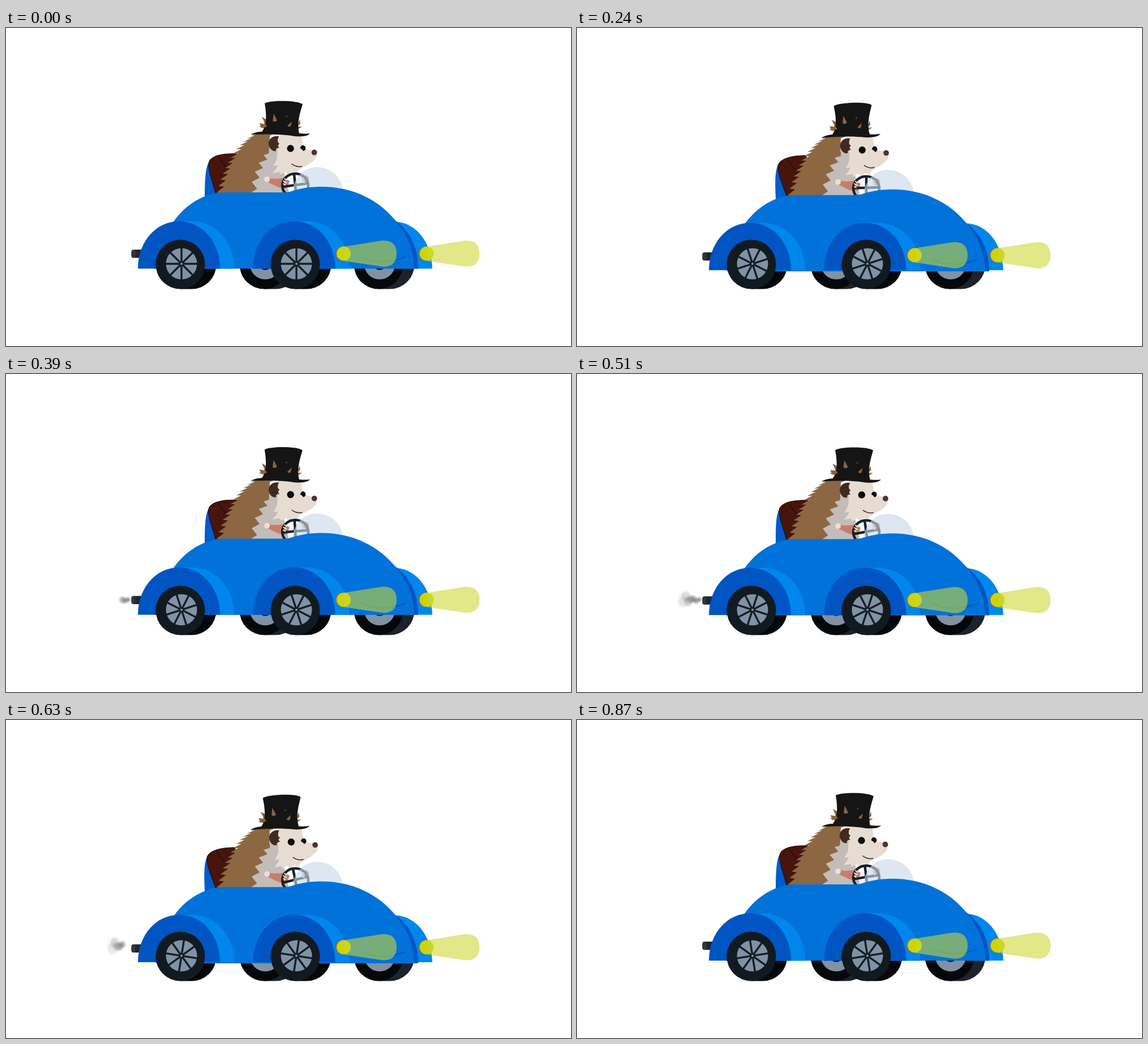
Write an HTML page that moves like this. It is 998x561 px and loops after 0.9 s.

```html
<!DOCTYPE html>
<html lang="en">
<head>
<meta charset="utf-8">
<title>Hedgehog driver</title>
<style>
html, body { margin: 0; width: 100%; height: 100%; overflow: hidden; background: #fff; }
svg { display: block; width: 998px; height: 561px; }
</style>
</head>
<body>
<svg viewBox="0 0 998 561">
  <defs>
    <filter id="soft" x="-50%" y="-50%" width="200%" height="200%"><feGaussianBlur stdDeviation="1.6"/></filter>
    <clipPath id="trail"><rect x="178" y="380" width="46" height="40"/></clipPath>
    <g id="fender">
      <path fill="#0086ec" d="M305 341H330C371 342 403 377 403 424.500H305Z"/>
      <path fill="#0055c3" d="M233 424.500C233 378 264 341 305.500 341S378 378 378 424.500Z"/>
      <path fill="#0049aa" d="M262 424.500C262 396 282 375 310 374V424.500Z"/>
    </g>
    <g id="lamp">
      <circle cx="594.500" cy="398" r="12.800" fill="#78705a"/>
      <circle cx="596.500" cy="398" r="12.500" fill="#cbd40c"/>
      <path fill="#cdd733" fill-opacity=".58" d="M598 385.500L658 376C679 372 690 380 690 398S679 424 658 420L598 411Z"/>
    </g>
  </defs>

  <g clip-path="url(#trail)"><g id="smoke" filter="url(#soft)" fill="#484848"></g></g>
  <g id="behind"></g>

  <g id="body">
    <rect x="221.500" y="391" width="30" height="14.500" rx="5" fill="#20262d"/>
    <rect x="221.500" y="391" width="7" height="14.500" rx="3.500" fill="#30363d"/>

    <g id="seat">
      <path fill="#005cca" d="M351 300C351 262 353 240 361 234L380 300Z"/>
      <path fill="#47150c" d="M371 294C363 264 355 247 359 235C366 224 385 221 410 222L400 294Z"/>
      <path fill="none" stroke="#1f0805" d="M371 294C363 264 355 247 359 235C366 224 385 221 408 222M376 228Q383 240 390 246"/>
      <path fill="none" stroke="#1f0805" stroke-width="1.500" stroke-dasharray="1.500 8" d="M366 232L386 270M376 228L392 255M388 225L398 240"/>
    </g>

    <path fill="#c3bcb9" d="M445 215L482 195L490 250L502 300H420Z"/>
    <path id="spines" fill="#8c6742"/>

    <g id="head">
      <path fill="#c3bcb9" d="M466 200L488 188V256L462 247Z"/>
      <path fill="#e7dcd2" d="M481 184H521L524 206C526 214 536 218 545 214Q552 221 547 230C540 240 526 244 516 251L514 258L507 253L499 259L494 254L484 259L484 254L470 256Q479 248 480 242L472 243Q480 232 479 224Z"/>
      <ellipse cx="524.500" cy="212" rx="4.700" ry="5" fill="#0b0b0b"/>
      <path fill="#e7dcd2" d="M517 212Q523 212 526 219L517 220Z"/>
      <circle cx="502.500" cy="212.500" r="6.200" fill="#080808"/>
      <circle cx="544.500" cy="219.500" r="4.900" fill="#4e3337"/>
      <path fill="none" stroke="#35221e" stroke-width="1.500" d="M504.500 239.500Q513 246.500 523 244"/>
      <path fill="#412a20" d="M482 191C467 189 463 200 464 206C466 214 471 218 477 217Q475 212 483 211Q478 208 483 204Q477 201 482 191Z"/>
    </g>

    <g id="hat">
      <path fill="#8b6140" d="M452 157L461 162L458 170ZM446 173L450 174L448 168L461 170L460 177L451 176ZM519 161L514 174L520 169ZM523 174L515 174L515 179Z"/>
      <path fill="#151515" d="M457 133C465 127 515 127 524 134.500C520 148 513 168 518 186Q528 187 537 186C533 191 522 192 510 191C488 187 459 187 432 188Q441 183 452 183C460 173 461 155 457 133Z"/>
      <path fill="#8b6140" d="M473 151L479 163Q476 167 471 164ZM505 165L503 173Q500 176 497 172ZM495 154L497 156L495 158ZM456 166L461 173L457 176Z"/>
    </g>

    <path fill="#c87d6b" d="M460 264Q476 268 492 264L501 270L496 283L481 281L461 271Z"/>
    <circle cx="461" cy="267" r="5" fill="#eadfd6"/>
    <path fill="#c87d6b" d="M522 262Q530 257 535 264L534 273L524 272Z"/>
    <g fill="none" stroke="#182129">
      <ellipse cx="511" cy="278" rx="23" ry="21" stroke-width="4.500"/>
      <path id="steer" stroke-width="4.500" d="M489 280L533 274M509 258L513 298"/>
    </g>
    <path fill="none" stroke="#efe3da" stroke-width="2" stroke-linecap="round" d="M492 266L496 268M490 270L495 273M490 275L493 277M523 264L526 266M523 268L526 270M525 272L527 273"/>
    <path fill="#c9d9e8" fill-opacity=".62" d="M505 295C507 264 525 245.500 549 245.500C574 245.500 592 264 595 285V295Z"/>
  </g>

  <path id="farFender" fill="#0086ec" d="M680 342H690C724 344 752 378 753 424.500H690Z"/>

  <g id="shell">
    <path fill="#0055c3" d="M686 338C714 358 728 387 728 424.500H690Z"/>
    <path fill="#0072d9" d="M265 424.500C275 350 318 301 372 291Q378 290 390 290H490Q500 290 507 287C524 282 540 280 558 280C612 280 659 303 690 342C708 365 721 390 721 424.500Z"/>
    <path fill="none" stroke="#0059c0" stroke-width="2" d="M626 404Q666 420 706 404"/>
  </g>

  <g id="trim">
    <use href="#fender"/>
    <use href="#fender" x="203.500"/>
    <use href="#lamp"/>
    <use href="#lamp" x="146.500"/>
  </g>

  <g id="front"></g>
</svg>
<script>
const LOOP = 900, STEP = 30, TAU = Math.PI * 2;
const $ = id => document.getElementById(id);
const add = (parent, tag, attrs) => {
  const el = document.createElementNS('http://www.w3.org/2000/svg', tag);
  for (const k in attrs) el.setAttribute(k, attrs[k]);
  return parent.appendChild(el);
};
const move = (id, value) => $(id).setAttribute('transform', value);

// Jagged fur along a quadratic curve, tips pushed out by (dx, dy).
function fur([ax, ay], [bx, by], [cx, cy], n, dx, dy) {
  const at = u => [
    (1 - u) ** 2 * ax + 2 * u * (1 - u) * bx + u * u * cx,
    (1 - u) ** 2 * ay + 2 * u * (1 - u) * by + u * u * cy
  ];
  const pts = [];
  for (let i = 0; i < n; i++) {
    const [x, y] = at(i / n), [tx, ty] = at((i + .6) / n);
    pts.push([x, y], [tx + dx, ty + dy]);
  }
  pts.push([cx, cy]);
  return pts;
}
const back = fur([447, 185], [401, 212], [382, 292], 13, -11, 3);
const side = fur([465, 213], [438, 238], [430, 292], 5, 12, 0).reverse();
$('spines').setAttribute('d', 'M' + [...back, [384, 300], [430, 300], ...side, [466, 190], [478, 185]].join('L') + 'Z');

// Tyre thickness, seen only below the bodywork.
const tread = (x, fill) => add($('behind'), 'path', {
  d: 'M0-43.500H20A43.500 43.500 0 0 1 20 43.500H0Z', fill, transform: `translate(${x} 417)`
});

const spokes = [];
function wheel(parent, x, tyre) {
  const g = add(parent, 'g', { transform: `translate(${x} 417)` });
  add(g, 'circle', { r: 43.5, fill: tyre });
  const hub = add(g, 'g', { transform: 'translate(2 -1)' });
  add(hub, 'circle', { r: 27.5, fill: '#8092a4' });
  return hub;
}
for (const x of [456, 658]) {
  tread(x, '#1e222c');
  const hub = wheel($('behind'), x, '#05080a');
  add(hub, 'circle', { r: 11, fill: '#141d25' });
}
for (const x of [308, 511]) {
  tread(x, '#05080a');
  const hub = wheel($('front'), x, '#111a21');
  const spin = add(hub, 'g', {});
  for (let a = 0; a < 180; a += 45)
    add(spin, 'path', { d: 'M-28 0H28', stroke: '#141d25', 'stroke-width': 3.4, transform: `rotate(${a})` });
  add(hub, 'circle', { r: 4, fill: '#141d25' });
  add(hub, 'circle', { r: 2, fill: '#8092a4' });
  spokes.push(spin);
}

const puffs = Array.from({ length: 11 }, (_, i) => ({
  born: 320 + i * 24,
  drift: Math.sin(i * 2.4) * 8,
  el: add($('smoke'), 'ellipse', {})
}));

function drawSmoke(t) {
  for (const { born, drift, el } of puffs) {
    const p = (t - born) / 200;
    if (p <= 0 || p >= 1) { el.setAttribute('opacity', 0); continue; }
    const attrs = {
      cx: 222 - 40 * p ** .85,
      cy: 399 + drift * p - 2 * p,
      rx: 3 + 7 * p,
      ry: 3 + 8 * p,
      opacity: .55 * (1 - p) ** .9
    };
    for (const k in attrs) el.setAttribute(k, attrs[k]);
  }
}

function draw(t) {
  const dip = (1 - Math.cos((t + 15) / 450 * TAU)) / 2;
  for (const id of ['body', 'shell']) move(id, `translate(0 ${5 * dip})`);
  for (const id of ['farFender', 'trim']) move(id, `translate(0 ${3 * dip})`);
  move('seat', `rotate(${-3.5 * dip} 372 295)`);
  move('head', `translate(${1.5 * dip} 0) rotate(${-2.6 * dip} 455 215)`);
  move('hat', `translate(${-.8 * dip} ${-1.5 * dip}) rotate(${-3 * dip} 485 188)`);
  move('steer', `rotate(${6 * Math.sin(t / LOOP * TAU)} 511 278)`);
  spokes.forEach(s => s.setAttribute('transform', `rotate(${t / LOOP * 270})`));
  drawSmoke(t);
}

const start = performance.now();
function tick() {
  const t = (performance.now() - start) % LOOP;
  draw(Math.floor(t / STEP) * STEP);
  requestAnimationFrame(tick);
}
draw(0);
requestAnimationFrame(tick);
</script>
</body>
</html>
```
